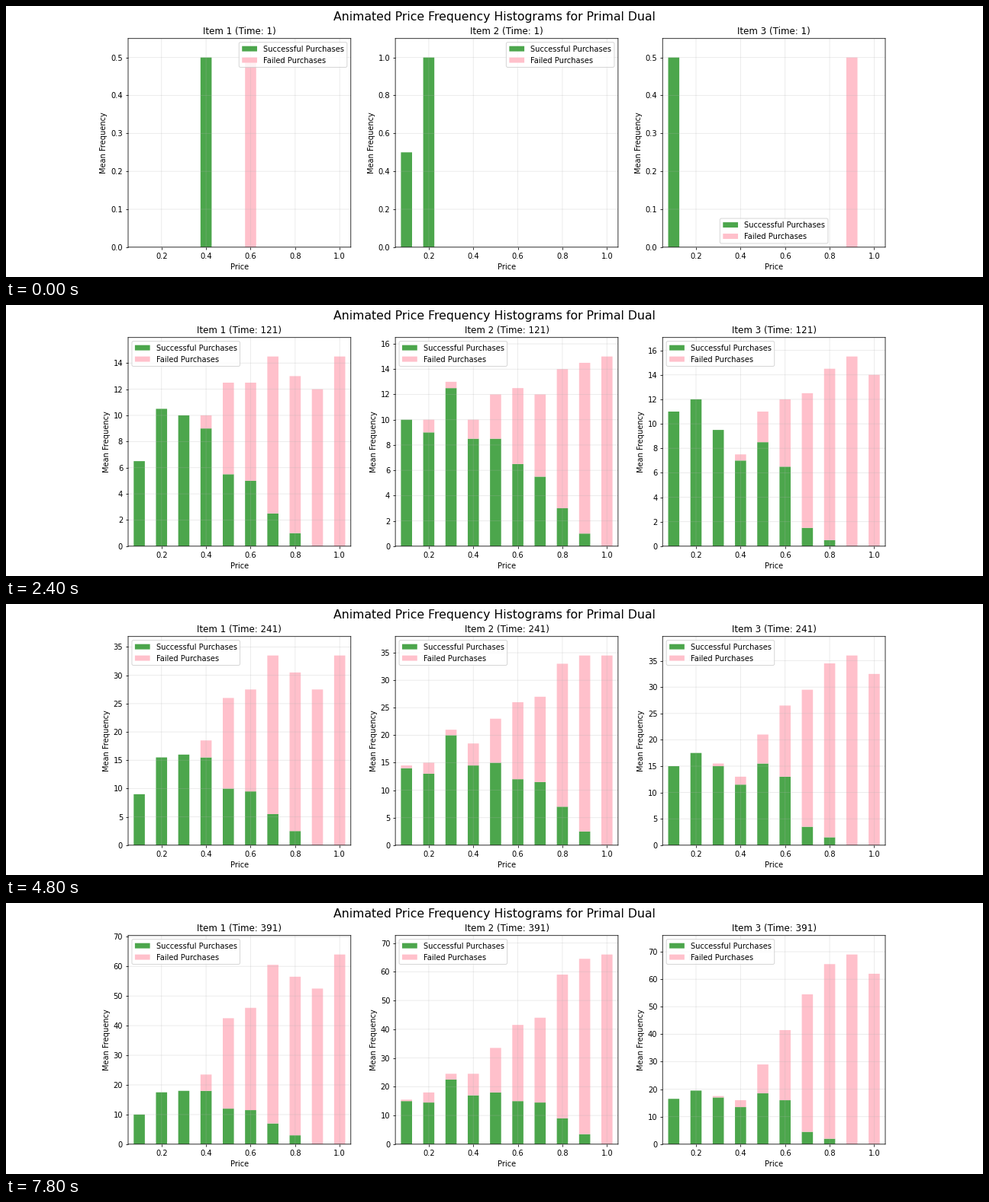
Animation of 1280x356 px, one loop 8 s. Source, as a matplotlib script:

```python
import numpy as np
import matplotlib.pyplot as plt
from matplotlib.animation import FuncAnimation

DPI = 640 / 9
WIDTH, HEIGHT = 1280, 356
FRAMES, INTERVAL, STEP = 40, 200, 10

PRICES = np.arange(1, 11) / 10
END_TIME = 1 + STEP * (FRAMES - 1)

plt.rcParams["font.family"] = "DejaVu Sans"
plt.rcParams["path.snap"] = False


class Item:
    """Mean counts per price, averaged over two runs.

    sold and failed are the counts at the end; first_sold and first_failed
    are the prices tried at the first time step.
    """

    def __init__(self, sold, failed, first_sold=(), first_failed=()):
        self.sold, self.failed = np.array(sold), np.array(failed)
        self.first_sold = first_counts(first_sold)
        self.first_failed = first_counts(first_failed)

    def at(self, time):
        u = time / END_TIME
        # Sales level off, later for dear prices; failures speed up.
        sold = halves(self.sold * (1 - (1 - u ** (0.7 + PRICES)) ** 2.2))
        failed = halves(self.failed * u * (0.6 + 0.4 * u))
        return (np.maximum(sold, self.first_sold),
                np.maximum(failed, self.first_failed))


def first_counts(prices):
    return 0.5 * sum((np.isclose(PRICES, p) for p in prices),
                     np.zeros(len(PRICES)))


def halves(values):
    """Round to steps of one half."""
    return np.floor(values * 2 + 0.5) / 2


items = (
    Item(sold=[10, 17.5, 18, 18, 12, 11.5, 7, 3, 0, 0],
         failed=[0, 0, 0, 5.5, 30.5, 34.5, 53.5, 53.5, 52.5, 64],
         first_sold=[0.4], first_failed=[0.6]),
    Item(sold=[15, 14.5, 22.5, 17, 18, 15, 14.5, 9, 3.5, 0],
         failed=[0.5, 3.5, 2, 7.5, 15.5, 26.5, 29.5, 50, 61, 66],
         first_sold=[0.2, 0.2]),
    Item(sold=[16.5, 19.5, 17, 13.5, 18.5, 16, 4.5, 2, 0, 0],
         failed=[0, 0, 0.5, 2.5, 10.5, 25.5, 50, 63.5, 69, 62],
         first_sold=[0.1], first_failed=[0.9]),
)

# The tiny margin keeps the pixel size from rounding down.
fig, axes = plt.subplots(
    1, 3, dpi=DPI, figsize=(WIDTH / DPI + 1e-6, HEIGHT / DPI + 1e-6))
fig.suptitle("Animated Price Frequency Histograms for Primal Dual", fontsize=16)


def draw_item(ax, number, item, time):
    sold, failed = item.at(time)
    ax.clear()
    ax.bar(PRICES, sold, width=0.05, color="green", alpha=0.7,
           label="Successful Purchases")
    ax.bar(PRICES, failed, width=0.05, bottom=sold, color="pink",
           label="Failed Purchases")
    ax.set_xlim(0.05, 1.05)
    ax.set_ylim(0, 1.1 * (sold + failed).max())
    ax.set_title(f"Item {number} (Time: {time})")
    ax.set_xlabel("Price")
    ax.set_ylabel("Mean Frequency")
    ax.grid(True, alpha=0.3)
    ax.legend()


def update(frame):
    time = 1 + STEP * frame
    for number, (ax, item) in enumerate(zip(axes, items), 1):
        draw_item(ax, number, item, time)
    return []


def init():
    return update(0)


anim = FuncAnimation(fig, update, frames=FRAMES, init_func=init,
                     interval=INTERVAL, repeat=True, repeat_delay=0)
plt.show()
```
